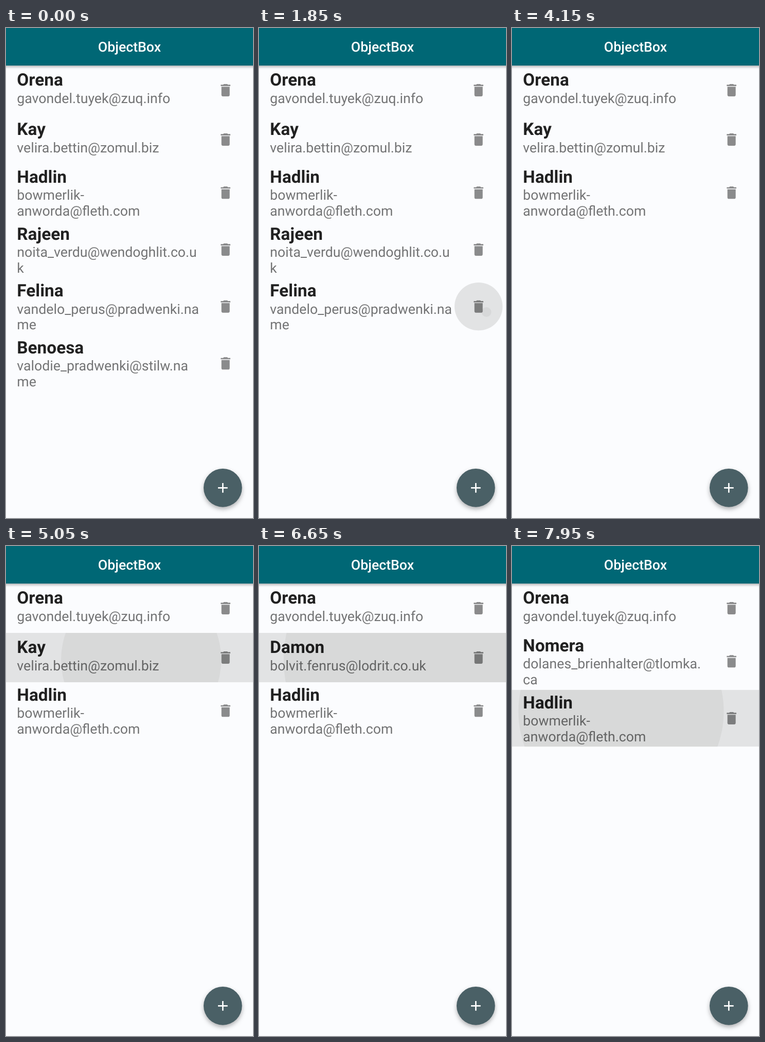
Animation, 480 px wide and 953 px high, one loop 8 s. Source, as an HTML page:

```html
<!DOCTYPE html>
<html lang="en">
<head>
<meta charset="utf-8">
<title>Contact list</title>
<style>
  html, body { margin: 0; height: 100%; overflow: hidden; background: #fbfcfe; }
  svg { font-family: Roboto, sans-serif; text-rendering: geometricPrecision; }
  #stage { display: block; width: 100vw; height: 100vh; }
  .name { font-size: 25px; font-weight: 700; fill: rgba(0, 0, 0, .87); }
  .mail { font-size: 20px; fill: rgba(0, 0, 0, .54); }
  .bin { fill: rgba(0, 0, 0, .45); }
  .bar { fill: #006775; filter: drop-shadow(0 2px 2px rgba(0, 0, 0, .3)); }
  .title { font-size: 20px; font-weight: 500; fill: #fff; text-anchor: middle; }
  .fab { fill: #4a6066; filter: drop-shadow(0 3px 3px rgba(0, 0, 0, .3)); }
</style>
</head>
<body>
<!-- One unit is 4/3 px on the 480 px wide stage -->
<svg id="stage" viewBox="0 0 360 714.75">
  <g id="list"></g>
  <rect class="bar" x="-10" y="-10" width="380" height="64.75"/>
  <text class="title" x="180" y="34.25">ObjectBox</text>
  <circle class="fab" cx="316" cy="670.75" r="28"/>
  <path d="M309 670.75h14M316 663.75v14" stroke="#fff" stroke-width="2"/>
</svg>
<script>
const LOOP = 8000, WIDTH = 360, LIST_TOP = 54.75, ICON_X = 320, ICON_R = 35;
const BIN = 'M6 19c0 1.1.9 2 2 2h8c1.1 0 2-.9 2-2V7H6zM19 4h-3.5l-1-1h-5l-1 1H5v2h14z';

// Each slot holds people in turn; a person leaves at `until`
const slots = [
  [{ name: 'Orena', mail: ['gavondel.tuyek@zuq.info'] }],
  [{ name: 'Kay', mail: ['velira.bettin@zomul.biz'], until: 5350 },
   { name: 'Damon', mail: ['bolvit.fenrus@lodrit.co.uk'], until: 6700 },
   { name: 'Nomera', mail: ['dolanes_brienhalter@tlomka.', 'ca'] }],
  [{ name: 'Hadlin', mail: ['bowmerlik-', 'anworda@fleth.com'] }],
  [{ name: 'Rajeen', mail: ['noita_verdu@wendoghlit.co.u', 'k'], until: 3550 }],
  [{ name: 'Felina', mail: ['vandelo_perus@pradwenki.na', 'me'], until: 2450 }],
  [{ name: 'Benoesa', mail: ['valodie_pradwenki@stilw.na', 'me'], until: 1050 }]
];

// Touch points relative to their row
const taps = [
  { slot: 5, icon: true, down: 340, up: 1050, x: 325.5, y: 50.5 },
  { slot: 4, icon: true, down: 1650, up: 2450, x: 334.4, y: 51.5 },
  { slot: 3, icon: true, down: 2990, up: 3550, x: 327, y: 45 },
  { slot: 1, down: 4470, up: 5300, x: 197, y: 39 },
  { slot: 1, down: 5830, up: 6660, x: 217, y: 39 },
  { slot: 2, down: 7230, up: LOOP, x: 159, y: 31.5 }
];

const clamp = v => Math.min(1, Math.max(0, v));
const mix = (a, b, k) => a + (b - a) * k;
const circle = (x, y, r, fill, alpha) =>
  `<circle cx="${x}" cy="${y}" r="${r}" fill="${fill}" fill-opacity="${alpha}"/>`;

// Press highlight fades in; the splash grows slowly while held, fast after release
function ink(tap, t, h) {
  const fade = 1 - clamp((t - tap.up) / 200);
  if (t < tap.down || !fade) return '';
  const held = Math.min(t, tap.up) - tap.down;
  const glow = .4 * clamp(held / 200) * fade;
  const reach = tap.icon ? ICON_R
    : Math.hypot(Math.max(tap.x, WIDTH - tap.x), Math.max(tap.y, h - tap.y));
  const grow = clamp(held / 1000 + Math.max(0, t - tap.up) / reach);
  const x = tap.icon ? mix(tap.x, ICON_X, grow) : tap.x;
  const y = tap.icon ? mix(tap.y, h / 2, grow) : tap.y;
  const highlight = tap.icon
    ? circle(ICON_X, h / 2, ICON_R, '#bcbcbc', glow)
    : `<rect width="${WIDTH}" height="${h}" fill="#bcbcbc" fill-opacity="${glow}"/>`;
  return highlight + circle(x, y, reach * grow, '#c8c8c8', .4 * fade);
}

function row({ name, mail }, slot, t, top, h) {
  const tall = mail.length > 1;
  const mailY = tall ? 52 : 54.5;
  return `<svg y="${top}" width="${WIDTH}" height="${h}">` +
    taps.filter(tap => tap.slot === slot).map(tap => ink(tap, t, h)).join('') +
    `<text class="name" x="16" y="${tall ? 27 : 29.5}">${name}</text>` +
    mail.map((line, i) => `<text class="mail" x="16" y="${mailY + 23 * i}">${line}</text>`).join('') +
    `<path class="bin" transform="translate(${ICON_X - 12} ${h / 2 - 12})" d="${BIN}"/></svg>`;
}

const list = document.getElementById('list');

function draw() {
  const t = performance.now() % LOOP;
  let top = LIST_TOP, out = '';
  slots.forEach((people, slot) => {
    const person = people.find(p => t < (p.until ?? LOOP));
    if (!person) return;
    const h = person.mail.length > 1 ? 83 : 72;
    out += row(person, slot, t, top, h);
    top += h;
  });
  list.innerHTML = out;
  requestAnimationFrame(draw);
}
draw();
</script>
</body>
</html>
```
